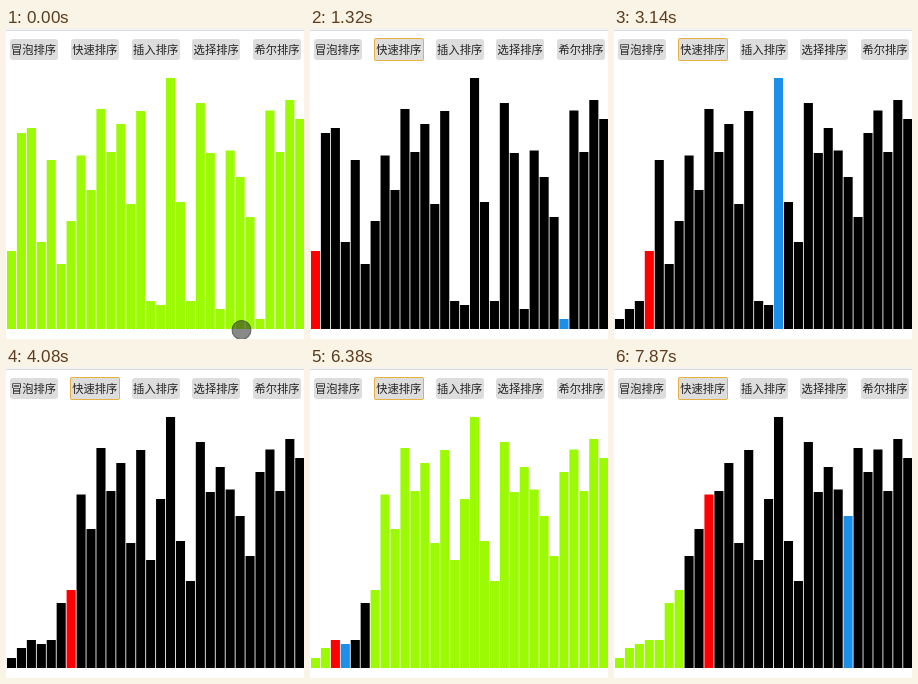
An HTML page with a canvas for the animation above (8000 ms loop, 298 by 311 pixels).

```html
<!DOCTYPE html>
<html lang="zh-CN">
<head>
<meta charset="utf-8">
<title>排序</title>
<style>
  html, body { margin: 0; width: 100%; height: 100%; overflow: hidden; background: #fff; }
  #stage { position: relative; width: 298px; height: 311px; overflow: hidden; }
  #stage > * { position: absolute; box-sizing: border-box; }
  #strip { left: 0; top: 0; width: 298px; height: 3px; background: #f3f3f3; border-bottom: 1px solid #dcdcdc; }
  canvas { left: 0; top: 0; }
  .button {
    top: 11px; width: 48px; height: 21px; border-radius: 3px; background: #ddd; color: #222;
    font: 11.3px/20px "Noto Sans CJK SC", "Noto Sans CJK", sans-serif;
    text-align: center; white-space: nowrap;
  }
  .button.focused { box-shadow: 0 0 0 1px #e8b040; border-radius: 1px; }
  #pointer {
    left: -10px; top: -10px; width: 20px; height: 20px; border-radius: 50%;
    background: rgba(40, 40, 40, .55); border: 1px solid rgba(40, 40, 40, .4);
  }
</style>
</head>
<body>
<div id="stage">
  <canvas id="chart" width="298" height="311"></canvas>
  <div id="strip"></div>
  <div class="button" style="left:3.5px">冒泡排序</div>
  <div class="button" id="quick" style="left:64.8px">快速排序</div>
  <div class="button" style="left:125.7px">插入排序</div>
  <div class="button" style="left:186.2px">选择排序</div>
  <div class="button" style="left:247px">希尔排序</div>
  <div id="pointer"></div>
</div>
<script>
const LOOP = 8000, TICK = 78.8, TICK_OFFSET = 22;
const MOVE_TICKS = 8, START_TICK = 11;
const BASE = 301, LEFT = 0.95, PITCH = 9.94, BAR_WIDTH = 9.1;
const GREEN = '#9cfb04', BLACK = '#000', RED = '#f00', BLUE = '#1c90e8';

const initial = [78, 196, 201, 87, 169, 65, 108, 173.5, 139, 220, 177, 205, 125, 218, 28,
  24, 251, 127, 28, 226, 176, 20, 178.5, 152, 112, 10, 218.5, 177, 229, 210];

// Ticks on which the sort pauses, because its steps are slower than the screen.
const rests = new Set([14, 18, 22, 27, 32, 36, 41, 44, 49, 53, 58, 63, 67, 71, 75, 80, 84, 88, 93, 98]);

function recordQuickSort(values) {
  const steps = [];
  const sort = (low, high) => {
    if (low >= high) return;
    let left = low, right = high, pivot = low;
    const record = scan => steps.push({ bars: [...values], low, high, pivot, scan });
    const swapPivot = other => {
      [values[pivot], values[other]] = [values[other], values[pivot]];
      pivot = other;
      record();
    };
    record();
    while (left < right) {
      for (; right > left; right--) {
        record(right);
        if (values[right] < values[pivot]) { swapPivot(right); left++; break; }
      }
      for (; left < right; left++) {
        record(left);
        if (values[left] > values[pivot]) { swapPivot(left); right--; break; }
      }
    }
    sort(low, pivot - 1);
    sort(pivot + 1, high);
  };
  sort(0, values.length - 1);
  return steps;
}

const steps = recordQuickSort([...initial]);
const idle = { bars: initial, low: 0, high: -1 };
const ctx = document.getElementById('chart').getContext('2d');
const quick = document.getElementById('quick');
const pointer = document.getElementById('pointer');

function stepAt(tick) {
  if (tick < START_TICK) return idle;
  let index = tick - START_TICK;
  for (const rest of rests) if (rest <= tick) index--;
  return steps[index];
}

function barColor({ low, high, pivot, scan }, i) {
  if (i === pivot) return RED;
  if (i === scan) return BLUE;
  return i >= low && i <= high ? BLACK : GREEN;
}

function draw(tick) {
  const step = stepAt(tick);
  ctx.clearRect(0, 0, 298, 311);
  step.bars.forEach((height, i) => {
    ctx.fillStyle = barColor(step, i);
    ctx.fillRect(LEFT + i * PITCH, BASE - height, BAR_WIDTH, height);
  });

  const progress = Math.min(tick / MOVE_TICKS, 1);
  const eased = progress * progress * (3 - 2 * progress);
  pointer.style.transform = `translate(${235.5 - 162 * eased}px, ${302 - 276 * eased}px)`;
  pointer.hidden = tick >= START_TICK;
  quick.classList.toggle('focused', tick >= START_TICK);
}

function frame() {
  const time = performance.now() % LOOP;
  draw(Math.min(Math.floor((time + TICK_OFFSET) / TICK), 100));
  requestAnimationFrame(frame);
}
frame();
</script>
</body>
</html>
```
